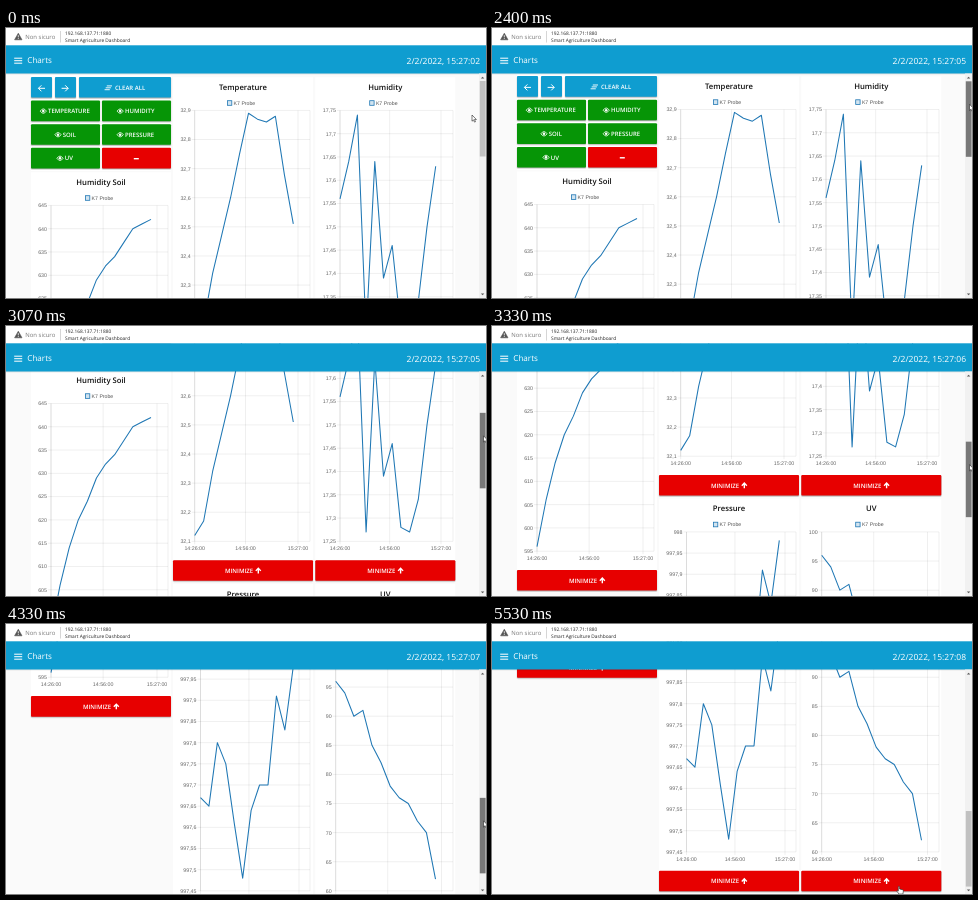
These frames come from a looping animation (480 by 270 pixels, 5.74 s). An HTML page:

```html
<!DOCTYPE html>
<html lang="en">
<head>
<meta charset="utf-8">
<title>Charts</title>
<style>
html, body { margin: 0; width: 100%; height: 100%; overflow: hidden; background: #fafafa; }
svg { display: block; width: 480px; height: 270px; }
text { font-family: "Open Sans", "Noto Sans", sans-serif; text-rendering: geometricPrecision; white-space: pre; }
.axis { font-family: "Liberation Sans", Arial, sans-serif; }
</style>
</head>
<body>
<svg id="stage" viewBox="0 0 480 270"></svg>
<script>
const LOOP = 5740, STEP = 1000 / 15;
const BLUE = '#0f9dd0', GREEN = '#069506', RED = '#e70000', LINE = '#1f77b4';
const stage = document.getElementById('stage');

function add(parent, tag, attrs) {
  const el = document.createElementNS('http://www.w3.org/2000/svg', tag);
  for (const k in attrs) el.setAttribute(k, attrs[k]);
  parent.appendChild(el);
  return el;
}
const rect = (p, x, y, width, height, fill, more) => add(p, 'rect', { x, y, width, height, fill, ...more });
const path = (p, d, stroke, width = 1, fill = 'none', more) =>
  add(p, 'path', { d, stroke, 'stroke-width': width, fill, ...more });

// y is the middle of the capital letters
function text(p, str, x, y, size, fill, more) {
  const el = add(p, 'text', { x, y: y + size * 0.355, 'font-size': size, fill, ...more });
  el.textContent = str;
  return el;
}
const MID = { 'text-anchor': 'middle' }, END = { 'text-anchor': 'end' }, SEMI = { 'font-weight': 600 };

const page = add(stage, 'g', {});

function button(x, y, w, fill, h = 20.6) {
  rect(page, x - 0.4, y + 0.5, w + 0.8, h + 1, '#000', { opacity: 0.13, rx: 1.4 });
  rect(page, x, y + 0.6, w, h, '#000', { opacity: 0.22, rx: 1 });
  rect(page, x, y, w, h, fill, { rx: 1 });
}
const caption = (str, x, y) => text(page, str, x, y, 6, '#fff', SEMI);

function eye(x, y) {
  path(page, `M${x - 3.1} ${y}q3.1 -4.4 6.2 0q-3.1 4.4 -6.2 0z`, '#fff', 0.8);
  add(page, 'circle', { cx: x, cy: y, r: 1.3, fill: '#fff' });
}

function minimize(x, y) {
  button(x, y, 140, RED);
  caption('MINIMIZE', x + 52, y + 10.5);
  path(page, `M${x + 85.3} ${y + 13.3}v-5.2m-2.5 2.6l2.5 -2.6l2.5 2.6`, '#fff', 1.4);
}

function controls() {
  rect(page, 25, 47, 140, 96, '#fff');
  const row = i => 49 + 23.6 * i;
  button(25, row(0), 21, BLUE);
  button(49, row(0), 21, BLUE);
  button(73, row(0), 92, BLUE);
  path(page, 'M39 60.3h-6.6m3 -3l-3 3l3 3', '#fff', 1);
  path(page, 'M55.6 60.3h6.6m-3 -3l3 3l-3 3', '#fff', 1);
  path(page, 'M100.8 57.9h5.2M99.7 59.8h5.2M98.6 61.7h5.2', '#fff', 0.9);
  caption('CLEAR ALL', 109, 59.7);
  const toggles = [
    ['TEMPERATURE', 0, 1, 37.3, 42], ['HUMIDITY', 1, 1, 114.2, 119],
    ['SOIL', 0, 2, 52, 56.8], ['PRESSURE', 1, 2, 114.2, 119], ['UV', 0, 3, 54, 58.8]
  ];
  for (const [name, col, r, ex, tx] of toggles) {
    button(25 + col * 71, row(r), 69, GREEN);
    eye(ex, row(r) + 10.5);
    caption(name, tx, row(r) + 10.5);
  }
  button(96, row(3), 69, RED);
  path(page, 'M127.8 130.7h5', '#fff', 1.4);
}

const format = v => String(+v.toFixed(2)).replace('.', ',');

function chart(c) {
  const { x, top, axis, right, last, max, step, ticks, data } = c;
  const y0 = top + 33.2, height = 232.9, bottom = y0 + height;
  const span = step * ticks;
  rect(page, x, top, 140, 307, '#fff');
  text(page, c.title, x + 70, top + 10, 7.7, '#111', { ...MID, ...SEMI });
  rect(page, x + 54.4, top + 23.5, 4.4, 4.6, '#d2e4f0', { stroke: LINE, 'stroke-width': 0.8 });
  text(page, 'K7 Probe', x + 60.6, top + 25.8, 5.2, '#555', { class: 'axis' });

  let grid = '';
  for (let i = 0; i <= ticks; i++) {
    const y = y0 + height * i / ticks;
    grid += `M${axis - 3} ${y}H${right}`;
    text(page, format(max - step * i), axis - 4, y, 5.3, '#666', { class: 'axis', ...END });
  }
  const perMin = (c.end - axis) / 61;
  [['14:26:00', 0], ['14:56:00', 30], ['15:27:00', 61]].forEach(([label, min]) => {
    const lx = axis + min * perMin;
    grid += `M${lx} ${y0}V${bottom + 3}`;
    text(page, label, lx, bottom + 7.2, 5.3, '#666', { class: 'axis', ...MID });
  });
  path(page, grid + `M${right} ${y0}V${bottom}`, '#000', 0.5, 'none', { opacity: 0.13 });
  path(page, `M${axis} ${y0}V${bottom}`, '#000', 0.5, 'none', { opacity: 0.16 });

  const pts = data.map((v, i) =>
    `${(axis + (last - axis) * i / (data.length - 1)).toFixed(2)} ${(y0 + (max - v) / span * height).toFixed(2)}`);
  path(page, 'M' + pts.join('L'), LINE, 1.05, 'none', { 'stroke-linejoin': 'round' });
  minimize(x, top + 284.9);
}

controls();
chart({ title: 'Humidity Soil', x: 25, top: 144.2, axis: 45, right: 162, last: 145, end: 151,
  max: 645, step: 5, ticks: 10,
  data: [596, 606, 614, 620, 624, 629, 632, 634, 637, 640, 641, 642] });
chart({ title: 'Temperature', x: 167, top: 49.2, axis: 188.7, right: 304, last: 287.3, end: 292,
  max: 32.9, step: 0.1, ticks: 8,
  data: [32.12, 32.17, 32.34, 32.47, 32.6, 32.75, 32.89, 32.87, 32.86, 32.88, 32.68, 32.51] });
chart({ title: 'Humidity', x: 309.3, top: 49.2, axis: 334, right: 447, last: 429.7, end: 435,
  max: 17.75, step: 0.05, ticks: 10,
  data: [17.56, 17.64, 17.74, 17.27, 17.64, 17.39, 17.46, 17.28, 17.27, 17.34, 17.5, 17.63] });
chart({ title: 'Pressure', x: 167, top: 357.8, axis: 194.5, right: 304, last: 287.3, end: 293,
  max: 998, step: 0.05, ticks: 11,
  data: [997.67, 997.65, 997.8, 997.75, 997.61, 997.48, 997.64, 997.7, 997.7, 997.91, 997.83, 997.98] });
chart({ title: 'UV', x: 309.3, top: 357.8, axis: 329.7, right: 447, last: 429.5, end: 435.5,
  max: 100, step: 5, ticks: 8,
  data: [96, 94, 90, 91, 85, 82, 78, 76, 75, 72, 70, 62] });

// Browser bar and page header
rect(stage, 0, 45, 480, 1.4, '#000', { opacity: 0.1 });
rect(stage, 0, 0, 480, 17.5, '#fff');
path(stage, 'M12.3 5.2L16 11.8H8.6z', '#555', 0.6, '#555', { 'stroke-linejoin': 'round' });
path(stage, 'M12.3 7.2v2.2m0 0.7v0.9', '#fff', 0.8);
text(stage, 'Non sicuro', 19.3, 8.8, 5.95, '#777');
path(stage, 'M54.5 3V14.5', '#bbb', 0.6);
text(stage, '192.168.137.71:1880', 59, 5.6, 4.8, '#222');
text(stage, 'Smart Agriculture Dashboard', 59, 12.6, 4.8, '#222');
rect(stage, 0, 17.3, 480, 28.2, BLUE);
path(stage, 'M8.2 30.2h8M8.2 32.7h8M8.2 35.2h8', '#fff', 1);
text(stage, 'Charts', 21.3, 32.5, 8.1, '#fff');
const clock = text(stage, '', 474, 32.5, 8.5, '#fff', END);

// Scrollbar
rect(stage, 473, 45.5, 7, 224.5, '#f1f1f1');
path(stage, 'M474.9 50.6l1.7 -1.9l1.7 1.9z', 'none', 0, '#555');
path(stage, 'M474.9 265.4l1.7 1.9l1.7 -1.9z', 'none', 0, '#555');
const thumb = rect(stage, 473.8, 53, 5.8, 75.5, '#c1c1c1');

// Pointers, tips at 0,0
const arrow = path(stage, 'M0 0V6.2L1.5 4.9L2.5 7.1L3.5 6.7L2.5 4.5H4.4z', '#222', 0.6, '#fff');
const hand = path(stage,
  'M0 0.6q0.7 -1 1.3 0V3l3 0.7q0.9 0.3 0.8 1.2L4.6 8H0.6L-1.6 4.8q0.5 -0.9 1.6 0.2z',
  '#222', 0.6, '#fff');

// Monotone cubic through [time, value] rows
function track(rows) {
  const n = rows.length;
  const slope = i => (rows[i + 1][1] - rows[i][1]) / (rows[i + 1][0] - rows[i][0]);
  const tangent = rows.map((r, i) => {
    if (i === 0 || i === n - 1) return 0;
    const a = slope(i - 1), b = slope(i);
    return a * b > 0 ? 2 * a * b / (a + b) : 0;
  });
  return t => {
    if (t <= rows[0][0]) return rows[0][1];
    if (t >= rows[n - 1][0]) return rows[n - 1][1];
    let i = 0;
    while (t >= rows[i + 1][0]) i++;
    const [ta, a] = rows[i], [tb, b] = rows[i + 1];
    const w = tb - ta, u = (t - ta) / w, v = 1 - u;
    return a * (1 + 2 * u) * v * v + b * u * u * (3 - 2 * u)
      + w * u * v * (tangent[i] * v - tangent[i + 1] * u);
  };
}

const scrollAt = track([[2333, 0], [2800, 33], [3333, 185], [3800, 289], [4333, 357], [4733, 396]]);
const pointerX = track([[1540, 466], [2130, 477.5], [4750, 477.5], [5400, 424], [5533, 406.3]]);
// Distance from the thumb's travel
const pointerY = track([[1540, 87], [2130, 76], [4750, 76], [5400, 128]]);

function draw(now) {
  const raw = now % LOOP + 4;
  const t = Math.floor(raw / STEP) * STEP;
  const scroll = scrollAt(t), travel = scroll * 0.3385;
  page.setAttribute('transform', `translate(0 ${-scroll})`);
  thumb.setAttribute('y', 53 + travel);
  thumb.setAttribute('fill', t < 1900 || t > 4860 ? '#c1c1c1' : t < 2190 ? '#a8a8a8' : '#787878');
  clock.textContent = '2/2/2022, 15:27:0' + (2 + Math.floor((raw + 800) / 1000));
  const x = pointerX(t), y = pointerY(t) + travel;
  const overButton = x < 449 && y > 246;
  arrow.setAttribute('visibility', overButton ? 'hidden' : 'visible');
  hand.setAttribute('visibility', overButton ? 'visible' : 'hidden');
  (overButton ? hand : arrow).setAttribute('transform', `translate(${x} ${y})`);
}

const start = performance.now();
function tick() {
  draw(performance.now() - start);
  requestAnimationFrame(tick);
}
tick();
</script>
</body>
</html>
```
